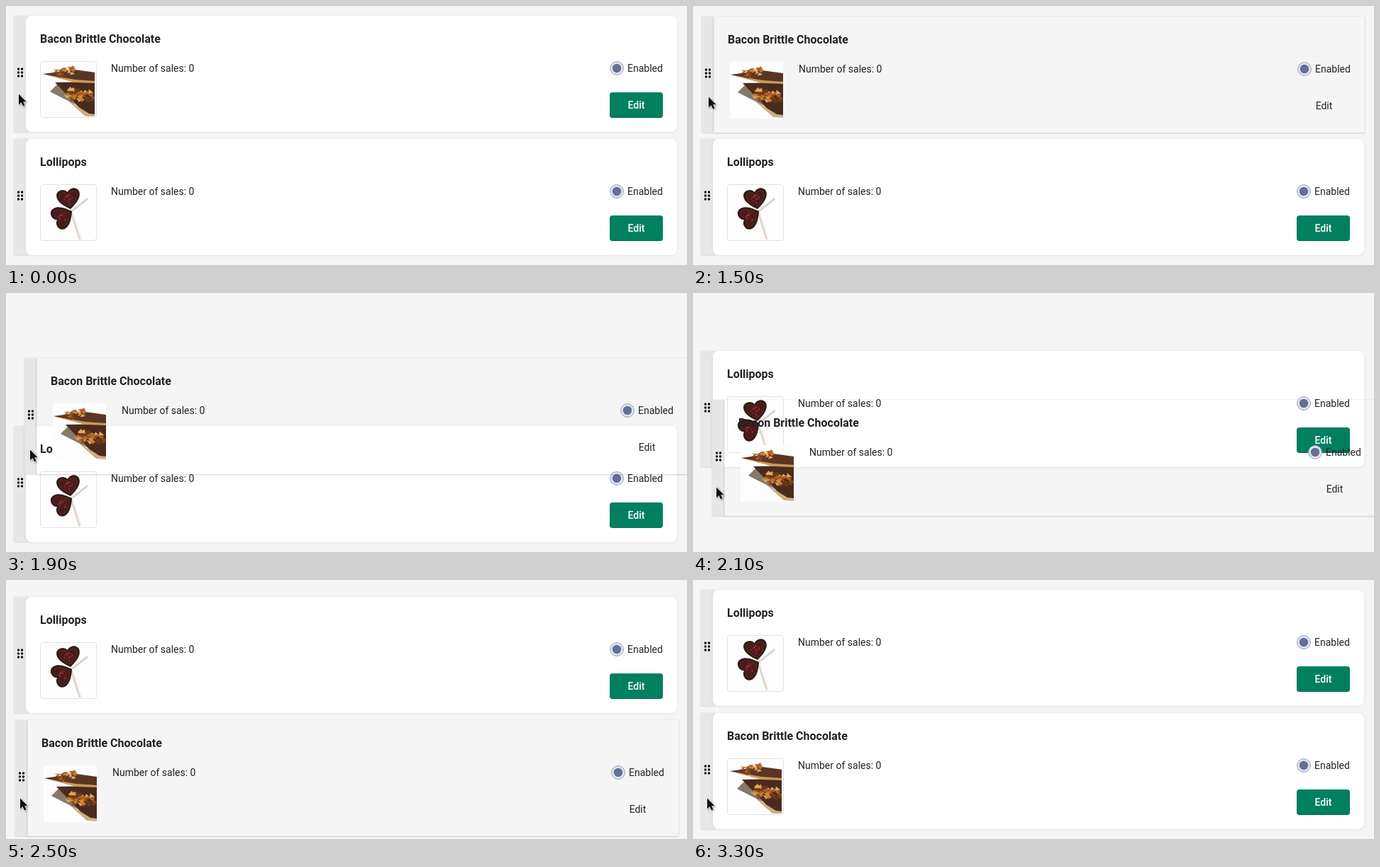
Write an HTML page that moves like this. It is 960 px wide and 366 px high and loops after 5.3 s.

```html
<!DOCTYPE html>
<html lang="en">
<head>
<meta charset="utf-8">
<title>Sortable products</title>
<style>
  html, body { margin: 0; width: 100%; height: 100%; overflow: hidden; background: #f5f5f5; }
  body { position: relative; font: 14px/20px Roboto, sans-serif; color: #202223; }
  div, svg { position: absolute; white-space: nowrap; }
  .item { left: 0; top: 0; width: 960px; height: 190px; }
  .handle { left: 11px; top: 14px; width: 20px; height: 164px; background: #e7e7e7; box-shadow: 0 0 2px rgba(0,0,0,.12), 0 1px 1px rgba(0,0,0,.06); }
  .card { left: 28px; top: 14px; width: 918px; height: 164px; border-radius: 8px; background: #fff; box-shadow: 0 0 5px rgba(23,24,24,.05), 0 1px 2px rgba(0,0,0,.05); }
  .dots { left: 10px; top: 84px; }
  .title { left: 48px; top: 34px; font-weight: 700; font-size: 16px; line-height: 25px; }
  .sales { left: 148px; top: 78px; }
  .photo { left: 51px; top: 78px; background: #fdfdfd; }
  .frame { left: 48px; top: 78px; width: 78px; height: 78px; border: 1px solid #dfe1e4; border-radius: 4px; }
  .radio { left: 851px; top: 78px; }
  .label { left: 876px; top: 78px; }
  .edit { left: 851px; top: 122px; width: 75px; height: 36px; border-radius: 4px; text-align: center; line-height: 36px; font-weight: 500; color: #fff; background: #008060; box-shadow: 0 1px 0 rgba(0,0,0,.05), inset 0 -1px 0 rgba(0,0,0,.2); }
  .item:not(.drag) .photo { clip-path: inset(2px 1px 2px 0); }
  .drag { z-index: 1; }
  .drag .handle { width: 17px; }
  .drag .card { background: none; border-radius: 0; box-shadow: 0 0 1px rgba(0,0,0,.22), 0 1px 2px rgba(0,0,0,.15); }
  .drag .frame { display: none; }
  .drag .edit { background: none; box-shadow: none; color: inherit; font-weight: 400; }
  #cursor { left: -2px; top: -3px; z-index: 2; filter: drop-shadow(1px 1px 1px rgba(0,0,0,.35)); }
</style>
</head>
<body>
<svg id="cursor" width="22" height="26"><path transform="translate(3 3)" d="M0 .5V15.5L3.5 12.3 6 17.6 8.6 16.5 6.2 11.2H10.6Z" fill="#111" stroke="#fff" stroke-width="1.2" paint-order="stroke"/></svg>
<script>
const LOOP = 5300, STEP = 100, GRAB = 1100, SWAP = 1980, RELEASE = 2850, DROP = 3200;
const SLOT = 174, POINTER = { x: 17, y: 124 }, POINTER_LEAD = 60;

let seed = 7;
const random = () => (seed = seed * 16807 % 2147483647) / 2147483647;
const poly = (fill, points) => `<polygon fill="${fill}" points="${points}"/>`;

// Small random triangles scattered over a tilted ellipse
function shards(count, cx, cy, rx, ry, tilt, size, colors) {
  let out = '';
  for (let i = 0; i < count; i++) {
    const a = random() * 2 * Math.PI, d = Math.sqrt(random()), turn = random() * 2 * Math.PI;
    const corners = [0, 1.7, 3.6].map(c => {
      const r = size * (.5 + random());
      return `${(rx * d * Math.cos(a) + r * Math.cos(turn + c)).toFixed(1)},${(ry * d * Math.sin(a) + r * .7 * Math.sin(turn + c)).toFixed(1)}`;
    });
    out += poly(colors[i % colors.length], corners.join(' '));
  }
  return `<g transform="translate(${cx} ${cy}) rotate(${tilt})">${out}</g>`;
}

const caramel = ['#a85f22', '#6f3a1a', '#d08a3c', '#8a4b1f', '#c47a30', '#e3a862'];
const brittle =
  poly('#857a66', '11,43 22,32 48,62') +
  poly('#4a2a1d', '18,30 75,29 75,78 62,76') +
  poly('#cdae84', '34,54 66,74 75,75 75,79 61,78') +
  poly('#5b3524', '1,18 46,12 75,16 75,30 46,29') +
  poly('#c99a5a', '0,18 46,26 75,28 75,31 46,30') +
  shards(26, 31, 15, 15, 6, -12, 4, caramel) +
  shards(46, 53, 48, 21, 9, 8, 4.5, caramel);

const heart = (x, y, angle) => `<g transform="translate(${x} ${y}) rotate(${angle}) scale(.97)">
  <path id="h" fill="#331a16" d="M0 0C-6-4-17-12-17-21C-17-31-4-32 0-25C4-32 17-31 17-21C17-12 6-4 0 0Z"/>
  <path fill="#4a1a19" stroke="#5a302a" d="M0-4C-5-7-13-14-13-20C-13-27-4-28 0-20C4-28 13-27 13-20C13-14 5-7 0-4Z"/>
  ${shards(42, 0, -15, 8, 6, 0, .9, ['#a82029', '#cf3d43', '#7b171d', '#e27874'])}</g>`.replace(' id="h"', '');
const lollipops =
  '<path d="M41 38L64 20M41 38L54 79" stroke="#d5cec6" stroke-width="3.4"/>' +
  '<path d="M41 37L63 19M42 38L55 79" stroke="#f3efe9" stroke-width="1.6"/>' +
  heart(40, 35, -10) + heart(42, 38, -120);

function addItem(title, picture) {
  const item = document.createElement('div');
  const dots = [0, 1, 2, 3, 4, 5].map(i =>
    `<circle cx="${7.5 + i % 2 * 5}" cy="${5 + (i >> 1) * 5}" r="1.7"/>`).join('');
  item.innerHTML = `<div class="handle"></div><div class="card"></div>
    <svg class="dots" width="20" height="20">${dots}</svg>
    <div class="title">${title}</div>
    <svg class="photo" width="75" height="80">${picture}</svg><div class="frame"></div>
    <div class="sales">Number of sales: 0</div>
    <svg class="radio" width="20" height="20"><circle cx="10" cy="10" r="9.4" fill="#e2e4ef" stroke="#949fc6"/><circle cx="10" cy="10" r="6.2" fill="#637094"/></svg>
    <div class="label">Enabled</div><div class="edit">Edit</div>`;
  item.className = 'item';
  return document.body.appendChild(item);
}
const first = addItem('Bacon Brittle Chocolate', brittle);
const second = addItem('Lollipops', lollipops);
const cursor = document.getElementById('cursor');

const clamp = u => Math.min(1, Math.max(0, u));
const smooth = u => u * u * (3 - 2 * u);
const easeOut = u => 1 - (1 - u) ** 3;
const progress = (t, start, duration) => clamp((t - start) / duration);

// The hand's path, joined by a smooth cubic curve
const hand = [
  { t: 1450, x: 0, y: 0 }, { t: 1700, x: 11, y: 23 }, { t: 2100, x: 16, y: 137 },
  { t: 2300, x: 9, y: 171 }, { t: 2500, x: 2, y: 184 }
];
function slope(i, axis) {
  const a = hand[i - 1], b = hand[i + 1];
  return a && b ? (b[axis] - a[axis]) / (b.t - a.t) : 0;
}
function handAt(t, axis) {
  const i = Math.max(0, hand.slice(0, -1).findLastIndex(p => p.t <= t));
  const a = hand[i], b = hand[i + 1], span = b.t - a.t, u = progress(t, a.t, span);
  return a[axis] + (b[axis] - a[axis]) * smooth(u)
    + span * u * (1 - u) * (slope(i, axis) * (1 - u) - slope(i + 1, axis) * u);
}

const place = (el, x, y) =>
  el.style.transform = `translate(${Math.round(x)}px, ${Math.round(y)}px)`;

function render(now) {
  const t = Math.floor(now % LOOP / STEP) * STEP;
  const dropped = t >= DROP;
  const settle = easeOut(progress(t, RELEASE, 2.5 * STEP * 2));
  const x = handAt(t, 'x'), y = handAt(t, 'y');
  first.classList.toggle('drag', t >= GRAB && !dropped);
  if (dropped) place(first, 0, SLOT);
  else if (t > RELEASE) place(first, x * (1 - settle), y + (SLOT - y) * settle);
  else place(first, x, y);
  place(second, 0, dropped ? 0 : SLOT - (SLOT - 10) * smooth(progress(t, SWAP, 200)));
  place(cursor, POINTER.x + handAt(t + POINTER_LEAD, 'x'), POINTER.y + handAt(t + POINTER_LEAD, 'y'));
}
function tick() {
  render(performance.now());
  requestAnimationFrame(tick);
}
tick();
</script>
</body>
</html>
```
